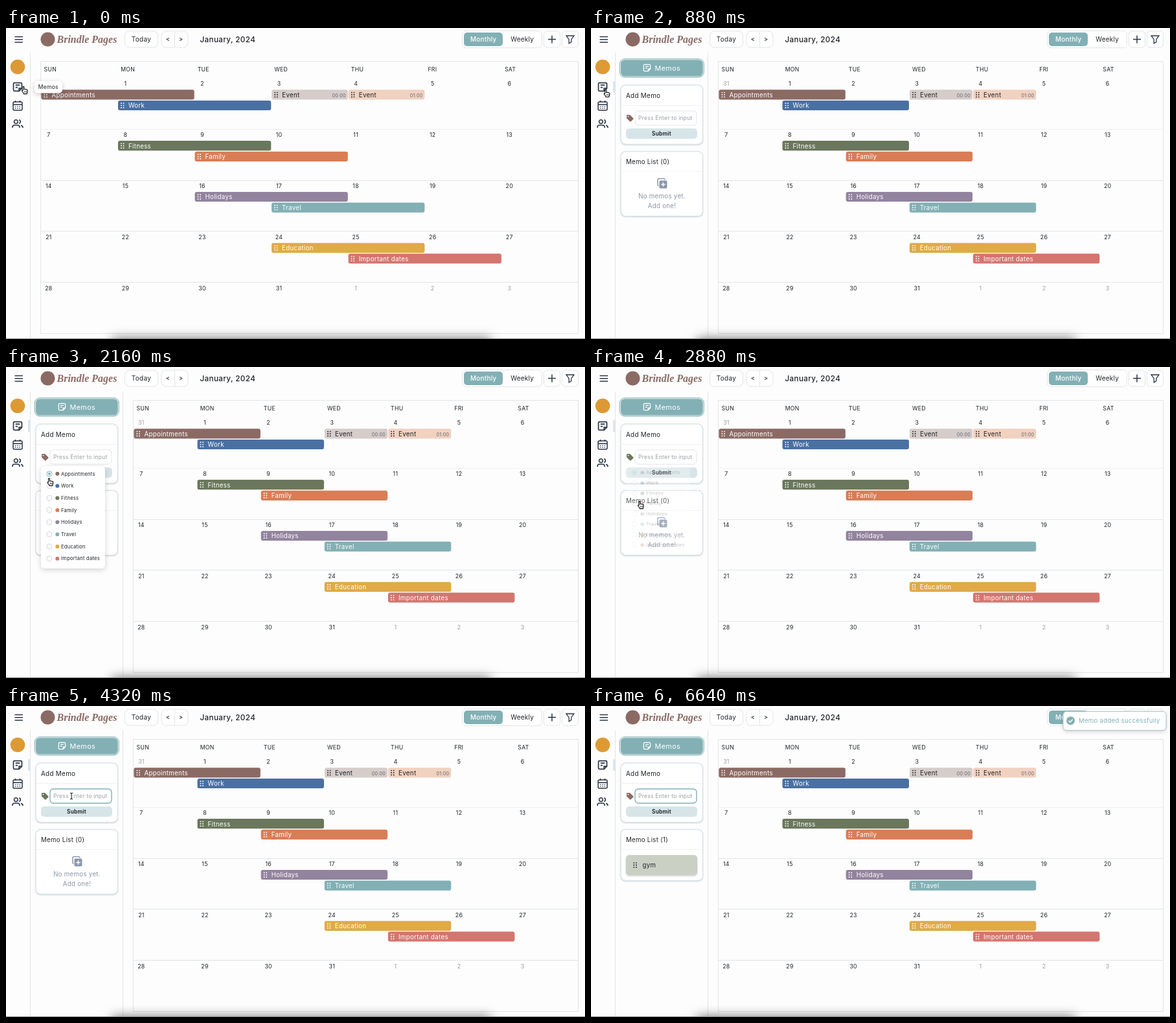
Recreate the animation shown at these times as an HTML page with a canvas. Size 894 by 480 pixels, loop 6.72 s.

```html
<!DOCTYPE html>
<html lang="en">
<head>
<meta charset="utf-8">
<title>Calendar memos</title>
<style>
html, body { margin: 0; width: 894px; height: 480px; overflow: hidden; background: #fdfdfd; }
canvas { display: block; width: 894px; height: 480px; }
</style>
</head>
<body>
<canvas id="stage"></canvas>
<script>
const W = 894, H = 480, LOOP = 6720, STEP = 80;
const canvas = document.getElementById('stage');
const dpr = window.devicePixelRatio || 1;
canvas.width = W * dpr;
canvas.height = H * dpr;
const c = canvas.getContext('2d');

const INK = '#1f2328', ICON = '#2d3646', LINE = '#e2e4e7', GRAY = '#9a9da3';
const TEAL = '#82b0b5', BROWN = '#8c6a64', GREEN = '#6a775c', PALE = '#d7e5e8';
const FONT = 'Inter, "Open Sans", sans-serif';
const WEEK = 78.8;

// time of each step, in ms
const OPEN = 400, POP_IN = 1680, PICK = 2720, FOCUS = 3680, TYPE = 4640, ENTER = 5200, ADDED = 5360, DONE = 5520;

const LABELS = [
  ['Appointments', BROWN], ['Work', '#4a70a2'], ['Fitness', GREEN], ['Family', '#d97d56'],
  ['Holidays', '#92839e'], ['Travel', TEAL], ['Education', '#e1aa47'], ['Important dates', '#d4756f']
];
// label index, week, lane, first day, number of days
const BARS = [
  [0, 0, 0, 0, 2], [1, 0, 1, 1, 2], [2, 1, 0, 1, 2], [3, 1, 1, 2, 2],
  [4, 2, 0, 2, 2], [5, 2, 1, 3, 2], [6, 3, 0, 3, 2], [7, 3, 1, 4, 2]
];
// pointer stops: time, x, y
const PATH = [
  [0, 29, 96], [160, 29, 96], [400, 23, 99], [800, 23, 99], [1440, 60, 142],
  [1840, 60, 142], [2480, 77, 213], [2960, 77, 213], [3520, 101, 139], [4560, 101, 139]
];

const clamp = v => Math.max(0, Math.min(1, v));
const ramp = (t, start, dur) => clamp((t - start) / dur);
const easeOut = (v, p) => 1 - Math.pow(1 - v, p);

function text(s, x, y, size, color = INK, align = 'left', weight = 400) {
  c.font = `${weight} ${size}px ${FONT}`;
  c.letterSpacing = size * 0.03 + 'px';
  c.textAlign = align;
  c.fillStyle = color;
  c.fillText(s, x, y + size * 0.36);
}

function box(x, y, w, h, r, fill, stroke, lw = 1) {
  if (w <= 0) return;
  c.beginPath();
  c.roundRect(x, y, w, h, r);
  if (fill) { c.fillStyle = fill; c.fill(); }
  if (stroke) { c.strokeStyle = stroke; c.lineWidth = lw; c.stroke(); }
}

function disc(x, y, r, fill) {
  c.beginPath();
  c.arc(x, y, r, 0, 7);
  c.fillStyle = fill;
  c.fill();
}

function lines(color, lw, ...paths) {
  c.strokeStyle = color;
  c.lineWidth = lw;
  c.beginPath();
  for (const p of paths) {
    c.moveTo(p[0], p[1]);
    for (let i = 2; i < p.length; i += 2) c.lineTo(p[i], p[i + 1]);
  }
  c.stroke();
}

function shape(d, fill, stroke, lw = 1) {
  const p = new Path2D(d);
  if (fill) { c.fillStyle = fill; c.fill(p); }
  if (stroke) { c.strokeStyle = stroke; c.lineWidth = lw; c.stroke(p); }
}

function at(x, y, draw, scale = 1) {
  c.save();
  c.translate(x, y);
  c.scale(scale, scale);
  draw();
  c.restore();
}

function raised(color, blur, dy, draw) {
  c.save();
  c.shadowColor = color;
  c.shadowBlur = blur * dpr;
  c.shadowOffsetY = dy * dpr;
  draw();
  c.restore();
}

function grip(x, y, color) {
  for (let i = 0; i < 6; i++) disc(x + (i % 2) * 3.6, y + (Math.floor(i / 2) - 1) * 3.4, 0.95, color);
}

function noteIcon(color, lw) {
  shape('M-6-4.5Q-6-6-4.5-6H4.5Q6-6 6-4.5V2L2 6H-4.5Q-6 6-6 4.5Z M6 2H2V6', null, color, lw);
  lines(color, lw, [-3, -2.6, 3, -2.6], [-3, 0.6, 0, 0.6]);
}

function header() {
  lines(ICON, 1.4, [13.5, 13.5, 26, 13.5], [13.5, 17.7, 26, 17.7], [13.5, 22, 26, 22]);
  disc(64.5, 17.5, 11, BROWN);
  c.font = 'italic 700 16px "Liberation Serif", serif';
  c.letterSpacing = '0px';
  c.textAlign = 'left';
  c.fillStyle = BROWN;
  c.fillText('Brindle Pages', 78.5, 23);

  box(183.5, 5, 51, 25, 7, '#fff', LINE);
  text('Today', 209, 17.7, 10, INK, 'center');
  box(240, 5, 41, 25, 7, '#fff', LINE);
  lines(LINE, 1, [260.5, 5, 260.5, 30]);
  text('<', 250, 18, 9.3, INK, 'center', 500);
  text('>', 270.3, 18, 9.3, INK, 'center', 500);
  text('January, 2024', 299.5, 17.7, 11.7, INK, 'left', 500);

  box(704.5, 4.5, 123, 26, 6, '#fff', LINE);
  box(707, 7, 60, 21, 5, TEAL);
  text('Monthly', 737.2, 17.7, 9.9, '#fff', 'center', 500);
  text('Weekly', 797.2, 17.7, 9.9, INK, 'center');
  box(830.5, 5, 25, 25, 5, '#fff', LINE);
  lines(ICON, 1.5, [837, 17.5, 849, 17.5], [843, 11.5, 843, 23.5]);
  box(858.5, 5, 25, 25, 5, '#fff', LINE);
  shape('M865 12H877L872.8 17.6V21.6L869.2 23.8V17.6Z', null, ICON, 1.3);
}

function sidebar(t) {
  lines(LINE, 1, [37.5, 38, 37.5, 479]);
  disc(18, 60, 11.3, '#dd9a34');
  if (t >= OPEN) box(34, 82, 3.5, 18, 1, '#dae6ec');
  at(18, 91, () => noteIcon(ICON, 1.6), 1.08);
  box(11, 114, 14, 13, 2, null, ICON, 1.5);
  lines(ICON, 1.5, [11, 118.3, 25, 118.3], [14.5, 112, 14.5, 115], [21.5, 112, 21.5, 115]);
  for (let i = 0; i < 6; i++) disc(14.8 + (i % 3) * 3.2, 121.3 + Math.floor(i / 3) * 2.8, 0.8, ICON);
  shape('M18.3 144.6A2.9 2.9 0 1 1 12.5 144.6A2.9 2.9 0 1 1 18.3 144.6 M10 154V153Q10 150 13 150H18Q21 150 21 153V154 M20.2 141.8A2.9 2.9 0 0 1 20.2 147.4 M23 150.2Q26 150.8 26 154', null, ICON, 1.6);
}

function bar(x, y, w, name, fill, color, hour) {
  box(x, y, w, 15.2, 3, fill);
  grip(x + 5, y + 7.7, color);
  text(name, x + 16, y + 7.9, 9.75, color);
  if (hour) text(hour, x + w - 3, y + 8.8, 7.2, '#5f6570', 'right');
}

function calendar(left) {
  const col = (883.5 - left) / 7;
  for (let r = 1; r < 5; r++) {
    const y = Math.round(77 + r * WEEK) + 0.5;
    lines(r > 1 ? LINE : '#f0f1f3', 1, [left, y, 883, y]);
  }
  c.strokeStyle = LINE;
  c.lineWidth = 1;
  c.strokeRect(left, 51.5, 883.5 - left, 420);
  ['SUN', 'MON', 'TUE', 'WED', 'THU', 'FRI', 'SAT'].forEach((d, i) => text(d, left + col * i + 5, 64.3, 8.7));
  for (let i = 0; i < 35; i++) {
    const day = i === 0 ? 31 : i > 31 ? i - 31 : i;
    const x = left + col * (i % 7) + 12.3, y = 86.3 + Math.floor(i / 7) * WEEK;
    text(day, x, y, 8.8, i === 0 || i > 31 ? GRAY : INK, 'center');
  }
  for (const [k, week, lane, day, n] of BARS)
    bar(left + col * day + 0.8, 95.3 + week * WEEK + lane * 16.6, col * n - 0.8, LABELS[k][0], LABELS[k][1], '#fff');
  bar(left + col * 3 + 1, 95.3, col - 1, 'Event', '#d6cdcb', INK, '00:00');
  bar(left + col * 4 + 1, 95.3, col - 1, 'Event', '#f1d1c0', INK, '01:00');
}

function card(y, w, h) {
  raised('rgba(110,140,155,.4)', 2, 0.8, () => box(45.5, y - 0.5, w + 1, h + 1, 8, '#d9e5e9'));
  box(46.7, y + 0.7, w - 1.4, h - 1.4, 7, '#fff');
}

function addCard(t, right, extra) {
  const w = right - 46.5;
  card(88, w, 91.5 + extra);
  c.save();
  c.beginPath();
  c.rect(47, 88, Math.max(0, w - 2), 92 + extra);
  c.clip();
  text('Add Memo', 54, 104, 9.9);
  lines('#edf0f2', 1, [47, 119.5, right, 119.5]);

  const green = t >= PICK && t < DONE;
  shape('M55 135Q55 134 56 134H60L65.3 139.2Q66 140 65.3 140.7L61.6 144.3Q60.8 145 60 144.3L55 139.3Z', green ? GREEN : BROWN);
  disc(57.5, 136.5, 0.9, '#fff');

  const focus = t >= FOCUS;
  box(68, 128, 95, 22, 5, '#fff', focus ? TEAL : LINE, focus ? 1.4 : 1);
  const typed = t < DONE ? 'gym'.slice(0, t < TYPE ? 0 : 1 + Math.floor((t - TYPE) / 160)) : '';
  if (typed) text(typed, 73.5, 139.3, 8.6);
  else text('Press Enter to input', 73, 139.3, 8.5, GRAY);

  const busy = t >= ENTER && t < DONE;
  const mid = (54 + right - 9) / 2;
  box(54, 155, right - 63, 16, 5, busy ? '#dce9ed' : PALE);
  text('Submit', mid + (busy ? 9 : 0), 163.3, 8.4, '#15181c', 'center', busy ? 500 : 600);
  if (busy) {
    const a = 0.6 + (t - 5440) / 1000 * 6.283;
    c.beginPath();
    c.arc(mid - 17.5, 163, 5, a, a + 1.9);
    c.strokeStyle = INK;
    c.lineWidth = 1.4;
    c.stroke();
  }
  if (extra) box(48, 179.5, w * w / 124, 7, 3.5, '#c5c9ce');
  c.restore();
}

function listCard(t, right, extra) {
  const w = right - 46.5, y = 190.5 + extra, mid = (46 + right) / 2, full = t >= ADDED;
  card(y, w, full ? 79 : 100);
  c.save();
  c.beginPath();
  c.rect(47, y, Math.max(0, w - 2), 100);
  c.clip();
  text(`Memo List (${full ? 1 : 0})`, 54, y + 16.5, 9.7);
  lines('#f0f2f4', 1, [47, y + 31, right, y + 31]);
  if (full) {
    raised('rgba(0,0,0,.2)', 3, 1.5, () => box(54, 230, right - 63, 31, 5, '#cad1c4'));
    grip(66.3, 245.5, INK);
    text('gym', 79.5, 245.5, 9.7);
  } else {
    const ink = '#8a97ab';
    box(mid - 6.5, y + 42, 11, 11, 2, null, ink, 1.5);
    box(mid - 4.5, y + 44.5, 13, 13, 2.5, ink, '#fff', 1);
    lines('#fff', 1.5, [mid - 1.3, y + 51, mid + 5.3, y + 51], [mid + 2, y + 47.7, mid + 2, y + 54.3]);
    text('No memos yet.', mid, y + 69, 9.7, '#8b95a5', 'center');
    text('Add one!', mid, y + 84, 9.7, '#8b95a5', 'center');
  }
  c.restore();
}

function panel(t, w) {
  if (w < 14) return;
  const edge = 38 + w, right = edge - 8;
  c.save();
  c.beginPath();
  c.rect(38, 38, w + 0.5, 440);
  c.clip();
  lines(LINE, 1, [edge - 0.5, 38, edge - 0.5, 479]);
  box(44.3, 47.8, w - 13, 28, 8, '#fff', '#9dc2c7', 1.4);
  box(45.8, 49.2, w - 16, 25.4, 6.5, TEAL);
  const mid = 38 + w / 2 - 0.5;
  at(mid - 22.5, 61.5, () => noteIcon('#fff', 1.5), 0.85);
  text('Memos', mid - 10.5, 62, 10.9, '#fff');
  const extra = right < 171 ? 9.3 : 0;
  addCard(t, right, extra);
  listCard(t, right, extra);
  c.restore();
}

function popup(t) {
  const k = t < PICK ? ramp(t, POP_IN, 200) : 1 - ramp(t, PICK, 215);
  if (k <= 0) return;
  c.save();
  c.globalAlpha = k;
  c.translate(0, 153);
  c.scale(1, 0.8 + 0.2 * k);
  raised(`rgba(0,0,0,${0.18 * k * k})`, 8, 2, () => box(54, 0, 99, 158, 5, '#fff'));
  LABELS.forEach(([name, color], i) => {
    const y = 11.8 + i * 18.7;
    c.beginPath();
    c.arc(67, y, 4, 0, 7);
    c.strokeStyle = i ? '#d0d4d8' : TEAL;
    c.lineWidth = 1;
    c.stroke();
    if (!i) disc(67, y, 2, TEAL);
    disc(79.3, y, 3, color);
    text(name, 85, y, 7.6, INK);
  });
  c.restore();
}

function tooltip(t) {
  const k = 1 - ramp(t, OPEN - STEP, 200);
  if (k <= 0) return;
  c.save();
  c.globalAlpha = k;
  raised('rgba(0,0,0,.22)', 7, 2, () => box(44, 82, 43, 18.5, 5, '#fff'));
  text('Memos', 65.3, 91.3, 8.5, INK, 'center');
  c.restore();
}

function toast(t) {
  const k = easeOut(ramp(t, DONE, 320), 2);
  if (k <= 0) return;
  c.save();
  c.globalAlpha = k;
  c.translate(0, -32 * (1 - k));
  raised('rgba(0,0,0,.18)', 6, 2, () => box(729, 8.5, 159, 29, 5, '#fff'));
  box(729, 8.5, 159, 29, 5, null, '#a9c9cd', 1);
  disc(740.5, 22.7, 6.5, TEAL);
  lines('#fff', 1.5, [737.5, 22.8, 739.8, 25, 743.7, 20.7]);
  text('Memo added successfully', 753, 23, 9.6, TEAL);
  c.restore();
}

function pointer(t) {
  if (t >= PATH[PATH.length - 1][0]) return;
  const i = PATH.findIndex(p => p[0] > t) - 1;
  const [t0, x0, y0] = PATH[i], [t1, x1, y1] = PATH[i + 1];
  const v = (t - t0) / (t1 - t0), s = v * v * (3 - 2 * v);
  const x = x0 + (x1 - x0) * s, y = y0 + (y1 - y0) * s;
  const inInput = t > 2960 && x > 68 && y > 128 && y < 150;
  const onLink = x < 32 || (t < 2960 && y > 132 && x > 54);
  at(x, y, () => {
    if (inInput) {
      const beam = 'M-2-5Q0-5 0-3.6Q0-5 2-5M0-4V4M-2 5Q0 5 0 3.6Q0 5 2 5';
      shape(beam, null, '#fff', 2.2);
      shape(beam, null, '#111', 1);
    } else if (onLink) {
      shape('M-3-4.6Q-2.9-5.6-2-5.6Q-1.1-5.6-1-4.6V-1.4Q0-2.2 1-1.3Q2-1.9 2.7-.8Q4-1.2 4.2.2V2.2Q4.1 3.6 3.3 4.5V5.6H-1.7V4.6Q-3.2 3.2-4.4.9Q-4.5-.4-3 .3Z', '#fff', '#111', 1.1);
      lines('#111', 0.7, [-0.4, 1.2, -0.4, 3.6], [1.2, 1.2, 1.2, 3.6], [2.7, 1.2, 2.7, 3.6]);
    } else {
      shape('M-3-5V4.4L-.9 2.5L.6 5.8L2.2 5.1L.8 1.9H3.6Z', '#111', '#fff', 0.9);
    }
  });
}

function bottomEdge() {
  raised('rgba(0,0,0,.6)', 18, 0, () => {
    c.fillStyle = '#555';
    c.fillRect(164, 480, 584, 20);
  });
  c.fillStyle = '#8d8d8d';
  c.fillRect(0, 479, W, 1);
}

function draw(t) {
  c.setTransform(dpr, 0, 0, dpr, 0, 0);
  c.fillStyle = '#fdfdfd';
  c.fillRect(0, 0, W, H);
  const w = 143 * easeOut(ramp(t, OPEN, 480), 2.55);
  header();
  calendar(53.6 + w);
  sidebar(t);
  panel(t, w);
  popup(t);
  tooltip(t);
  toast(t);
  bottomEdge();
  pointer(t);
}

const start = performance.now();
function tick(now) {
  const t = Math.max(0, now - start) % LOOP;
  draw(Math.floor(t / STEP) * STEP);
  requestAnimationFrame(tick);
}
draw(0);
requestAnimationFrame(tick);
</script>
</body>
</html>
```
